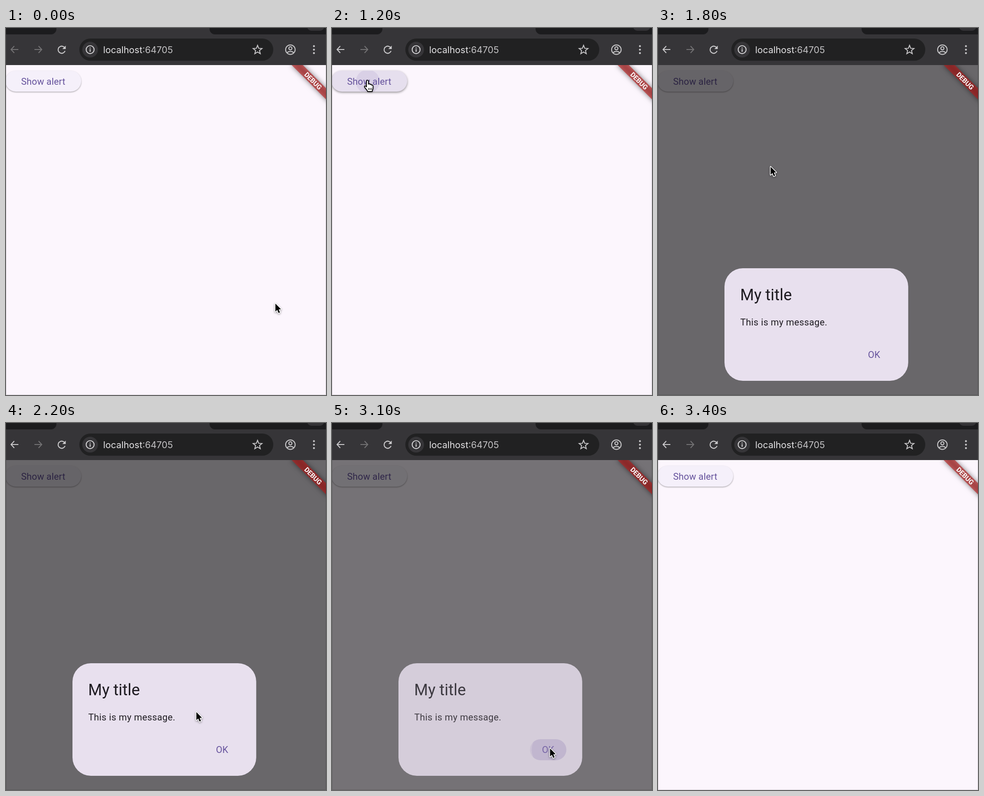
An HTML page with a canvas that plays this animation: 698x802 px, repeating every 3800 ms.

```html
<!DOCTYPE html>
<html lang="en">
<head>
<meta charset="utf-8">
<title>Show alert</title>
<style>
html, body { margin: 0; width: 100%; height: 100%; overflow: hidden; background: #fcf6fd; }
canvas { display: block; width: 698px; height: 802px; }
</style>
</head>
<body>
<canvas id="stage" width="698" height="802"></canvas>
<script>
const W = 698, H = 802, TOP = 81, LOOP = 3800, STEP = 100;
const K = 1.4375; // device pixels per logical pixel
const c = document.getElementById('stage').getContext('2d');
const PURPLE = '#65529c';
const ROBOTO = 'Roboto, sans-serif';

// Cursor keys: time, x, y (top left of the pointer)
const PATH = [
  [0, 586, 600], [500, 212, 241], [600, 212, 241], [1200, 70, 113],
  [1300, 75, 111], [1800, 244, 301], [2400, 449, 698], [2600, 469, 710],
  [3000, 469, 710], [3100, 474, 709], [3200, 474, 709], [3400, 530, 802]
];
const EASE = {
  0: u => u * u * (3 - 2 * u),
  600: u => 1 - (1 - u) ** 2,
  1300: u => u ** 1.5,
  1800: u => 1 - (1 - u) ** 1.6
};

function cursorAt(t) {
  for (let i = 1; i < PATH.length; i++) {
    const [t0, x0, y0] = PATH[i - 1], [t1, x1, y1] = PATH[i];
    if (t <= t1) {
      const u = (t - t0) / (t1 - t0), e = (EASE[t0] || (v => v))(u);
      return [x0 + (x1 - x0) * e, y0 + (y1 - y0) * e];
    }
  }
  return null;
}

function pill(x, y, w, h, r, fill) {
  c.beginPath();
  c.roundRect(x, y, w, h, r);
  c.fillStyle = fill;
  c.fill();
}

function disc(x, y, r, fill) {
  c.beginPath();
  c.arc(x, y, r, 0, 7);
  c.fillStyle = fill;
  c.fill();
}

function poly(points, close) {
  c.beginPath();
  points.forEach(([x, y]) => c.lineTo(x, y));
  if (close) c.closePath();
}

function text(s, x, y, font, color, spacing = 0) {
  c.font = font;
  c.letterSpacing = spacing + 'px';
  c.fillStyle = color;
  c.fillText(s, x, y);
  return c.measureText(s).width;
}

function shadow(color, blur, dy) {
  c.shadowColor = color;
  c.shadowBlur = blur;
  c.shadowOffsetY = dy;
}

function noShadow() {
  shadow('transparent', 0, 0);
}

function navArrow(x, dir, color) {
  c.strokeStyle = color;
  c.lineWidth = 2;
  poly([[x - 8 * dir, 47], [x + 7.5 * dir, 47]]);
  c.stroke();
  poly([[x + dir, 39.5], [x + 8 * dir, 47], [x + dir, 54.5]]);
  c.stroke();
}

function reload() {
  c.strokeStyle = c.fillStyle = '#c9c8ca';
  c.lineWidth = 2.1;
  c.beginPath();
  c.arc(121.5, 47.5, 7.8, 0.35, 5.55);
  c.stroke();
  poly([[130.3, 38.6], [130.3, 46], [122.9, 46]], true);
  c.fill();
}

function star(x, y) {
  const pts = [];
  for (let i = 0; i < 10; i++) {
    const r = i % 2 ? 4.4 : 10.2, a = -Math.PI / 2 + i * Math.PI / 5;
    pts.push([x + r * Math.cos(a), y + r * Math.sin(a)]);
  }
  poly(pts, true);
  c.strokeStyle = '#c9c8ca';
  c.lineWidth = 1.9;
  c.stroke();
}

function browserBar(canGoBack) {
  const light = '#c9c8ca';
  c.fillStyle = '#363538';
  c.fillRect(0, 0, W, TOP);
  pill(-20, -20, 130, 34, 12, '#1c1c1e');
  pill(444, -20, 300, 34, 12, '#1c1c1e');
  pill(657, -20, 37, 26, 9, '#343336');

  navArrow(19, -1, canGoBack ? light : '#737274');
  navArrow(70, 1, '#737274');
  reload();

  pill(160, 23, 423, 48.5, 24.2, '#212122');
  disc(183.5, 47.3, 17.2, '#363538');
  c.strokeStyle = '#dcdbdd';
  c.lineWidth = 1.9;
  c.beginPath();
  c.arc(183.5, 47.3, 8.7, 0, 7);
  c.stroke();
  c.fillStyle = '#dcdbdd';
  c.fillRect(182.5, 46.2, 2, 5.8);
  c.fillRect(182.5, 42.6, 2, 2.1);

  const font = '20px Inter, sans-serif';
  const w = text('localhost', 212, 54.5, font, '#e4e3e5');
  text(':64705', 212 + w, 54.5, font, '#c4c3c5');
  star(548.7, 48);

  c.strokeStyle = light;
  c.lineWidth = 2;
  c.beginPath();
  c.arc(620.3, 47.3, 10.4, 0, 7);
  c.stroke();
  c.beginPath();
  c.arc(620.3, 44.3, 3.4, 0, 7);
  c.stroke();
  c.beginPath();
  c.ellipse(620.3, 55.5, 7.2, 4.3, 0, Math.PI * 1.08, Math.PI * 1.92);
  c.stroke();
  for (const y of [39.7, 47.3, 54.9]) disc(671.7, y, 2.1, light);
}

function ripple(x, y, w, h, cx, cy, r, color) {
  c.save();
  c.beginPath();
  c.roundRect(x, y, w, h, h / 2);
  c.clip();
  disc(cx, cy, r, color);
  c.restore();
}

function showButton(hover, pressed) {
  shadow(hover ? 'rgba(0,0,0,.42)' : 'rgba(0,0,0,.34)', hover ? 5 : 3, hover ? 2 : 1.4);
  pill(-1.2, 93.3, 165.2, 45.6, 22.8, pressed ? '#e6dfee' : hover ? '#ebe5f3' : '#f5f0fa');
  noShadow();
  if (pressed) ripple(-1.2, 93.3, 165.2, 45.6, 78, 117, 26, 'rgba(101,82,156,.1)');
  text('Show alert', 33, 123.6, 14 * K + 'px ' + ROBOTO, PURPLE, 0.144);
}

function dialog(alpha, hover, splash) {
  c.save();
  c.globalAlpha = alpha;
  pill(145, 525, 400.8, 246, 40, '#e8e0ee');
  text('My title', 179.3, 594.6, 24 * K + 'px ' + ROBOTO, '#1d1a20');
  text('This is my message.', 179.5, 650.2, 14 * K + 'px ' + ROBOTO, '#1f1c22', 0.36);
  if (hover) pill(431.8, 691, 79.4, 46, 23, 'rgba(101,82,156,.1)');
  if (splash) ripple(431.8, 691, 79.4, 46, 475, 714, splash, 'rgba(101,82,156,.12)');
  text('OK', 457.9, 721.3, 14 * K + 'px ' + ROBOTO, PURPLE, 0.144);
  c.restore();
}

function banner() {
  c.save();
  c.translate(704.4, TOP);
  c.rotate(Math.PI / 4);
  shadow('rgba(0,0,0,.8)', 11.4, 0);
  c.fillStyle = 'rgba(183,28,28,.627)';
  c.fillRect(-40 * K, 28 * K, 80 * K, 12 * K);
  noShadow();
  c.textAlign = 'center';
  text('DEBUG', 0, 34 * K + 5.2, '700 ' + 10.2 * K + 'px ' + ROBOTO, '#fff');
  c.restore();
}

function arrow(x, y) {
  c.save();
  c.translate(x + 1.6, y + 2.2);
  poly([[0, 0], [0, 17.6], [4, 13.9], [6.9, 20.6], [10, 19.2], [7.1, 12.7], [12.2, 12.4]], true);
  c.lineJoin = 'round';
  c.lineWidth = 3;
  c.strokeStyle = '#fff';
  shadow('rgba(0,0,0,.4)', 4, 1.5);
  c.stroke();
  noShadow();
  c.fillStyle = '#000';
  c.fill();
  c.restore();
}

function hand(x, y) {
  c.save();
  c.translate(x, y);
  const p = new Path2D('M5.2 15.5V3.4C5.2.4 9.6.4 9.6 3.4V9.8C10 8 13.2 8.4 13.2 10.6' +
    'C13.8 9.3 16.6 9.8 16.6 12C17.4 11 19.6 11.6 19.6 14V18.5C19.6 21 17.8 23 17.6 26' +
    'H7.8C7.4 23 4.2 21.2 1.2 16.6C-.4 13.8 2.4 12 5.2 15.5Z');
  c.lineJoin = 'round';
  shadow('rgba(0,0,0,.35)', 4, 1.5);
  c.fillStyle = '#fff';
  c.fill(p);
  noShadow();
  c.strokeStyle = '#000';
  c.lineWidth = 1.8;
  c.stroke(p);
  c.lineWidth = 1.2;
  for (const kx of [9.8, 13, 16.2]) {
    poly([[kx, 18], [kx, 22.5]]);
    c.stroke();
  }
  c.restore();
}

function draw(t) {
  const pressed = t === 1200;
  const hoverShow = t >= 1000 && t <= 1300;
  const hoverOk = t >= 2400 && t <= 3200;
  const splash = t === 3000 ? 22 : t >= 3100 ? 39.5 : 0;
  const open = t < 1300 || t >= 3300 ? 0 : t < 3100 ? 1 : t < 3200 ? 0.83 : 0.15;
  const shade = open === 1 ? 0.58 : open > 0.5 ? 0.535 : open * 0.58;

  c.fillStyle = '#fcf6fd';
  c.fillRect(0, 0, W, H);
  showButton(hoverShow, pressed || t === 1300);
  if (open) {
    c.fillStyle = `rgba(0,0,0,${shade})`;
    c.fillRect(0, TOP, W, H - TOP);
    dialog(open, hoverOk, splash);
  }
  banner();
  c.fillStyle = 'rgba(0,0,0,.15)';
  c.fillRect(0, TOP, 1, H - TOP);
  c.fillRect(W - 1, TOP, 1, H - TOP);
  c.fillRect(1, H - 1, W - 2, 1);
  browserBar(t >= 1200);

  const pos = t < 3400 && cursorAt(t);
  if (pos) {
    const onButton = (t >= 1000 && t < 1300) || (t >= 2400 && t < 3100);
    (onButton ? hand : arrow)(...pos);
  }
}

function tick() {
  const t = performance.now() % LOOP;
  draw(Math.floor(t / STEP) * STEP);
  requestAnimationFrame(tick);
}
tick();
</script>
</body>
</html>
```
